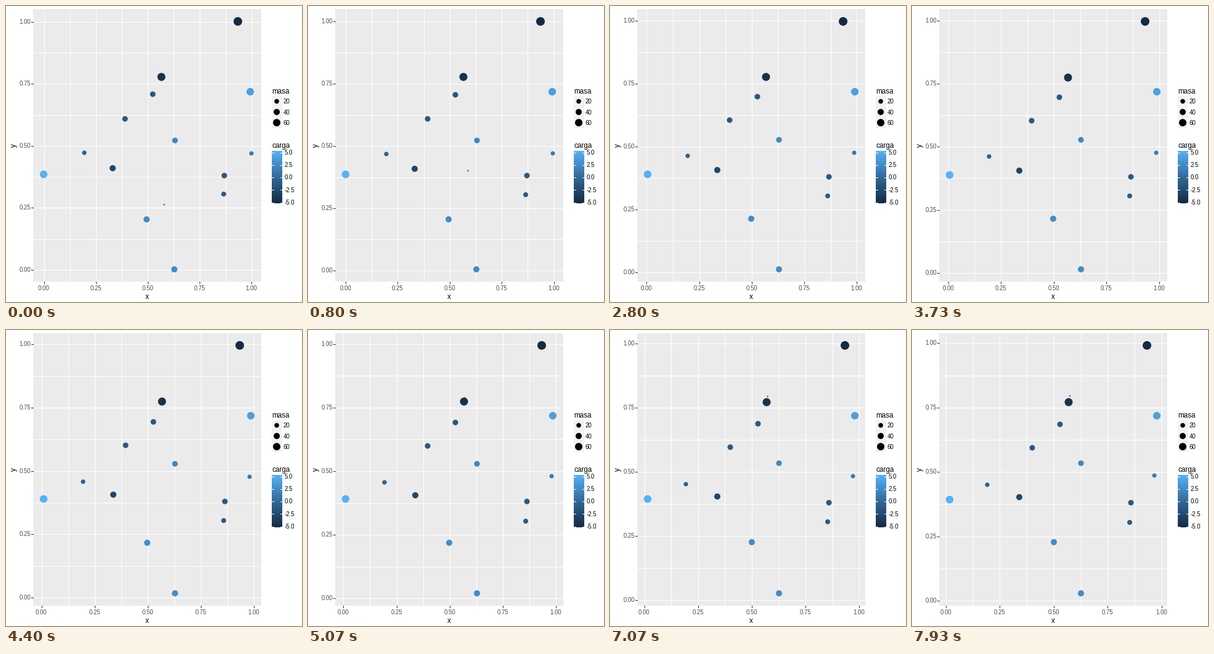
A matplotlib script for the animation above (8000 ms loop, 480 px wide and 480 px high).

```python
import numpy as np
import matplotlib.pyplot as plt
from matplotlib.animation import FuncAnimation
from matplotlib.colors import LinearSegmentedColormap
from matplotlib.patches import Circle, Rectangle

plt.rcParams["font.family"] = "Liberation Sans"

SIZE, DPI = 480, 96
PT = 72 / DPI                      # points per pixel
INTERVAL, FRAMES = 50, 160
STEP, LEAD, STEPS = 400, 150, 20   # ms per step, head start, number of steps
LEFT, TOP, RIGHT, BOTTOM = 44, 5, 414, 447
BLUES = LinearSegmentedColormap.from_list(
    "carga", ["#132B43", "#336A98", "#56B1F7"])

# start x, y, end x, y, radius, charge
BODIES = [
    (376.3, 25, 381, 25, 7, -5.2),
    (251.6, 114.6, 254.3, 116.8, 6.5, -4.6),
    (238.4, 143.4, 239.8, 153.4, 4.5, -1.5),
    (193.4, 182.6, 194.7, 190.8, 4.5, -1.5),
    (127.2, 238.5, 122.4, 251.4, 3.6, -0.8),
    (173.2, 263.2, 174.2, 270.8, 5, -3),
    (61, 272.8, 61, 274.6, 6.2, 5.2),
    (274.4, 218, 274.4, 216, 4.6, 2.1),
    (396.4, 139, 397.2, 139, 6.1, 3.9),
    (397.6, 239.3, 393.2, 236.4, 3.5, 1.2),
    (354.5, 274.6, 355.4, 280.4, 4.5, -1.4),
    (353.2, 305.2, 353.2, 312, 4, -1.2),
    (228.2, 346, 230, 344, 5, 2.5),
    (273.2, 427, 274.2, 427, 5, 2.5),
]

fig = plt.figure(figsize=(SIZE / DPI, SIZE / DPI), dpi=DPI, facecolor="white")
ax = fig.add_axes([0, 0, 1, 1])
ax.axis("off")


def box(x0, y0, x1, y1, color):
    ax.add_patch(Rectangle((x0, y0), x1 - x0, y1 - y0, fc=color, lw=0, zorder=0))


def line(xs, ys, color="white", z=1):
    return ax.plot(xs, ys, color=color, lw=PT, zorder=z,
                   antialiased=False, solid_capstyle="butt")[0]


def label(x, y, s, size=9.6, color="black", **kw):
    return ax.text(x, y, s, size=size * PT, color=color, va="baseline", **kw)


def dot(x, y, r, color, z=3):
    return ax.add_patch(Circle((x, y), r, fc=color, lw=0, zorder=z))


def shade(charge):
    return BLUES((charge + 5.2) / 10.4)


def draw_legends():
    label(431, 142, "masa", 11.6)
    for i, (mass, r) in enumerate([(20, 3.8), (40, 5), (60, 6)]):
        y = 146 + 17.28 * i
        box(431, y, 448, y + 17.28, "#F2F2F2")
        dot(439, y + 8.6, r, "black")
        label(449.8, y + 12.4, str(mass))
    label(431, 230, "carga", 11.6)
    ax.imshow(np.linspace(1, 0, 256)[:, None], cmap=BLUES, vmin=0, vmax=1,
              extent=(431, 448, 320, 235), aspect="auto", zorder=1)
    for i in range(5):
        y = 237 + 20.25 * i
        for x in (431, 444.6):
            line([x, x + 3.4], [int(y) + 0.5] * 2, z=2)
        label(451.6, y + 3.8, f"{5 - 2.5 * i:.1f}")


box(LEFT, TOP, RIGHT, BOTTOM, "#EBEBEB")
draw_legends()
label(229, 475, "x", 11.6, ha="center")
ax.text(12.5, 226, "y", size=11.6 * PT, rotation=90, ha="center", va="center")

values = np.arange(9) / 8
vlines = [line([0, 0], [TOP, BOTTOM]) for _ in values]
hlines = [line([LEFT, RIGHT], [0, 0]) for _ in values]
majors = range(0, 9, 2)
xticks = [line([0, 0], [BOTTOM, BOTTOM + 3], "#333333") for _ in majors]
yticks = [line([LEFT - 3, LEFT], [0, 0], "#333333") for _ in majors]
xlabels = [label(0, 461, f"{values[i]:.2f}", color="#4D4D4D", ha="center")
           for i in majors]
ylabels = [label(40, 0, f"{values[i]:.2f}", color="#4D4D4D", ha="right")
           for i in majors]
speck = dot(0, 0, 1.3, shade(0.5), 2.5)
dots = [dot(x, y, r, shade(q)) for x, y, _, _, r, q in BODIES]

ax.set_xlim(0, SIZE)
ax.set_ylim(SIZE, 0)


def speck_at(k):
    """Falls ever faster towards the heavy body, then creeps out behind it."""
    if k < 5:
        return 256.5 + 1.4 * k, 114 + 208 * np.sqrt(1 - k / 4.36)
    return 254.5 + 0.2 * (k - 13), 110 - 0.43 * (k - 13)


def update(frame):
    k = (frame * INTERVAL + LEAD) // STEP
    f = k / STEPS
    # the axes widen as the cloud of bodies contracts
    x0, x1 = 61.1 - 6.7 * f, 397.3 + 7.2 * f
    y0, y1 = 427.3 + 11.3 * f, 25.3 - 4.5 * f
    gx = np.floor(x0 + (x1 - x0) * values) + 0.5
    gy = np.floor(y0 + (y1 - y0) * values) + 0.5
    for i in range(len(values)):
        vlines[i].set_xdata([gx[i]] * 2)
        hlines[i].set_ydata([gy[i]] * 2)
    for n, i in enumerate(majors):
        xticks[n].set_xdata([gx[i]] * 2)
        yticks[n].set_ydata([gy[i]] * 2)
        xlabels[n].set_x(gx[i])
        ylabels[n].set_y(gy[i] + 3.7)
    for d, (sx, sy, ex, ey, _, _) in zip(dots, BODIES):
        d.center = round(sx + (ex - sx) * f), round(sy + (ey - sy) * f)
    speck.center = speck_at(k)
    return []


anim = FuncAnimation(fig, update, frames=FRAMES, interval=INTERVAL,
                     init_func=lambda: update(0), repeat=True, repeat_delay=0)
plt.show()
```
